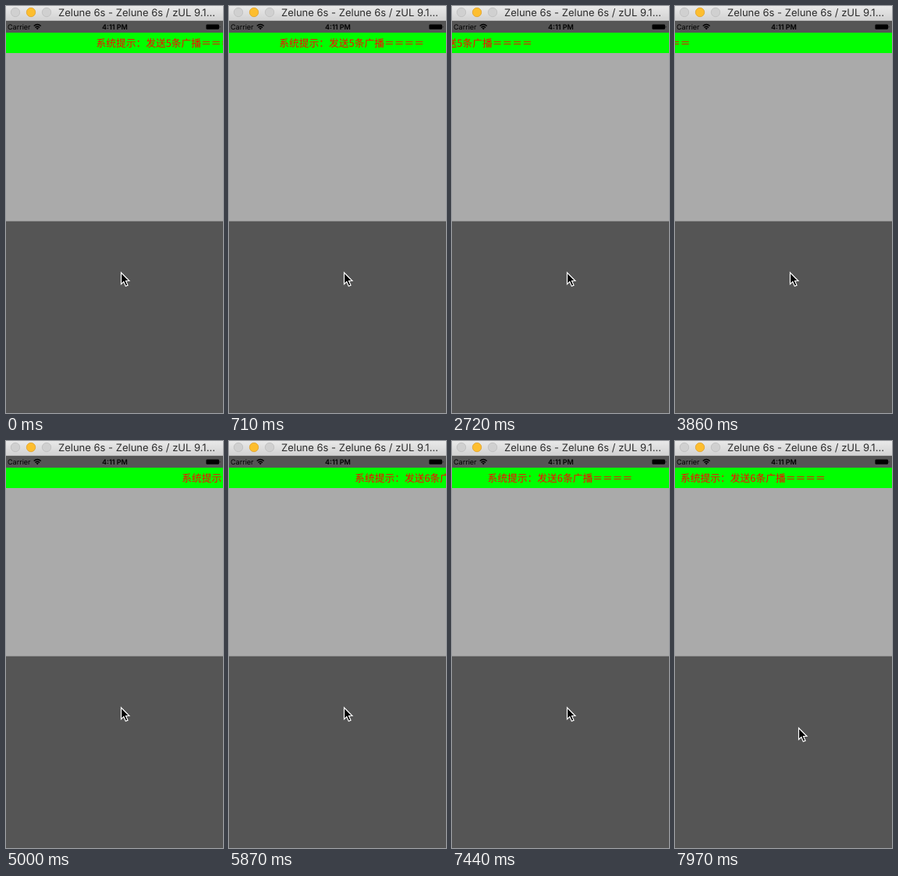
An HTML page that plays this animation: 278 px wide and 519 px high, repeating every 8000 ms.

```html
<!DOCTYPE html>
<html lang="zh">
<head>
<meta charset="utf-8">
<title>Marquee</title>
<style>
  html, body { margin: 0; width: 100%; height: 100%; overflow: hidden; background: #555; }
  svg { display: block; text-rendering: geometricPrecision; }
  .title { font: 13px Inter, sans-serif; fill: #2b2b2b; }
  .status { font: 9px Inter, sans-serif; fill: #000; }
  .clock { font-weight: 600; text-anchor: middle; }
  .notice { font: 500 12.75px "Noto Sans CJK SC", "Noto Sans CJK", sans-serif; fill: #f00; }
</style>
</head>
<body>
<svg width="278" height="519" viewBox="0 0 278 519">
  <defs>
    <linearGradient id="chrome" x2="0" y2="1">
      <stop stop-color="#e9e9e9"/>
      <stop offset="1" stop-color="#d1d1d1"/>
    </linearGradient>
  </defs>

  <rect width="278" height="519" fill="#555"/>
  <rect width="278" height="19" fill="url(#chrome)"/>
  <rect y="18.4" width="278" height=".6" fill="#aaa"/>
  <g fill="#d0d0d0" stroke="#bdbdbd" stroke-width=".8">
    <circle cx="12" cy="8" r="5.7"/>
    <circle cx="32" cy="8" r="5.7" fill="#fdbe2f" stroke="#e0a12a"/>
    <circle cx="52" cy="8" r="5.7"/>
  </g>
  <text class="title" x="67" y="13">Zelune 6s - Zelune 6s / zUL 9.1...</text>

  <text class="status" x="2" y="30">Carrier</text>
  <g fill="none" stroke="#000" stroke-width="1.4">
    <path d="M35.7 25.6Q40.2 21.6 44.7 25.6M37.4 27.5Q40.2 25 43 27.5"/>
    <path d="M38.6 28.5Q40.2 27.2 41.8 28.5L40.2 30.2Z" fill="#000" stroke="none"/>
  </g>
  <text class="status clock" x="139.5" y="30">4:11 PM</text>
  <rect x="256.4" y="23.4" width="16.6" height="6.4" rx="1.4"/>
  <path d="M273.7 25.2q1.6 1.4 0 2.8z"/>

  <rect y="34" width="278" height="26" fill="#0f0"/>
  <rect y="60" width="278" height="214.5" fill="#aaa"/>
  <text class="notice" id="first" y="51.5">系统提示：发送5条广播＝＝＝＝</text>
  <text class="notice" id="second" y="51.5">系统提示：发送6条广播＝＝＝＝</text>

  <path id="pointer" d="M0 0V14.6L3.3 11.5L5.8 17.3L8.5 16.1L6 10.5H10.4Z"
        stroke="#fff" stroke-width="1.2"/>
</svg>
<script>
  const LOOP = 8000, TICK = 87.5, LAST = 91;
  const [first, second, pointer] =
    ["first", "second", "pointer"].map(id => document.getElementById(id));

  const place = (node, x, y = 0) => node.setAttribute("transform", `translate(${x} ${y})`);

  function draw(time) {
    const tick = Math.max(0, Math.floor((time - 2) / TICK));
    place(first, 115.5 - 6.4 * tick);
    place(second, 278 - 6.42 * (tick - 48.8));

    // The pointer only starts to drift at the very end.
    const drift = [0.4, 1][tick - LAST + 1] ?? 0;
    place(pointer, 147.5 + 11 * drift, 340 + 26 * drift);
  }

  const start = performance.now();
  function frame() {
    draw((performance.now() - start) % LOOP);
    requestAnimationFrame(frame);
  }
  frame();
</script>
</body>
</html>
```
